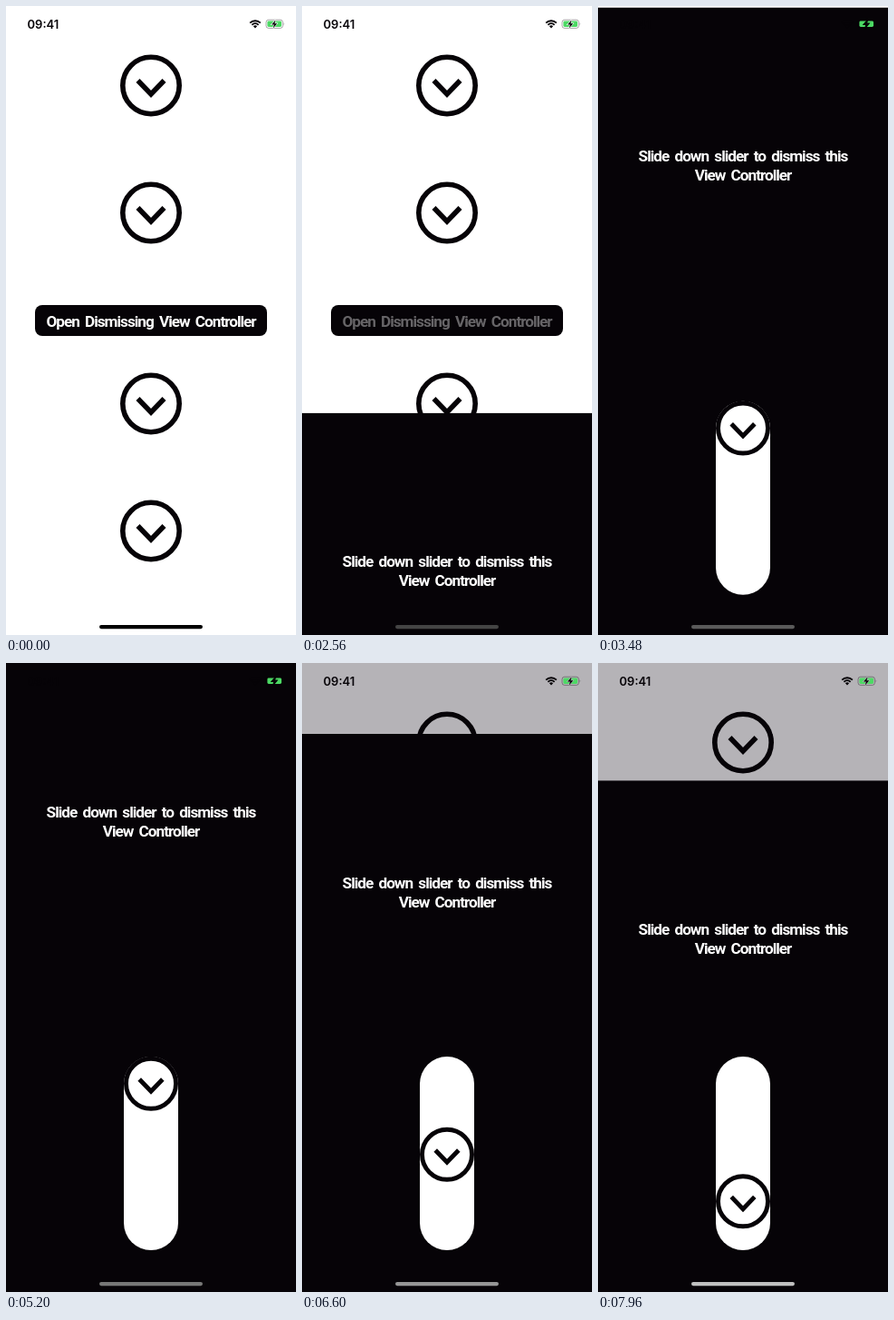
Write an HTML page that moves like this. It is 320 px wide and 692 px high and loops after 8 s.

```html
<!DOCTYPE html>
<html lang="en">
<head>
<meta charset="utf-8">
<title>Slide to dismiss</title>
<style>
  html, body { margin: 0; width: 100%; height: 100%; overflow: hidden; background: #fff; }
  svg { display: block; width: 100%; height: 100%; color: #060307; fill: currentColor; }
  .label { font: 700 17.2px Roboto, "Liberation Sans", sans-serif; letter-spacing: -1px; word-spacing: 2.9px; text-anchor: middle; fill: #fff; }
  .time { font: 600 13px Inter, sans-serif; }
</style>
</head>
<body>
<svg viewBox="0 0 320 692">
  <defs>
    <g id="arrow" fill="none" stroke="currentColor" stroke-width="5.6">
      <circle r="31.2"/>
      <path d="M-14.5-5.5 0 9.5 14.5-5.5"/>
    </g>
  </defs>

  <rect id="page" width="320" height="692" fill="#fff"/>
  <use href="#arrow" x="160" y="87.5"/>
  <use href="#arrow" x="160" y="227.5"/>
  <use href="#arrow" x="160" y="437.5"/>
  <use href="#arrow" x="160" y="577.5"/>
  <rect x="32" y="329" width="256" height="34" rx="8"/>
  <text id="title" class="label" x="160" y="353">Open Dismissing View Controller</text>

  <g id="sheet">
    <rect width="320" height="700"/>
    <text class="label" x="160" y="169.5">Slide down slider to dismiss this</text>
    <text class="label" x="160" y="190.5">View Controller</text>
  </g>
  <rect id="track" x="130" y="433" width="60" height="213" rx="30" fill="#fff"/>
  <g id="knob">
    <circle r="28" fill="#fff"/>
    <use href="#arrow" transform="scale(.882)"/>
  </g>

  <text class="time" x="23.5" y="24.5">09:41</text>
  <g transform="translate(275 24.4)">
    <path d="M-5.8-5.8A8.2 8.2 0 0 1 5.8-5.8M-3.6-3.6A5.1 5.1 0 0 1 3.6-3.6" fill="none" stroke="currentColor" stroke-width="1.9"/>
    <path d="M0 0-2.1-2.1A3 3 0 0 1 2.1-2.1Z"/>
  </g>
  <rect x="287" y="15.2" width="18.4" height="9.2" rx="2.7" fill="none" stroke="currentColor" stroke-opacity=".35"/>
  <path d="M306.6 18.2q1.4 1.6 0 3.2z" opacity=".4"/>
  <rect x="288.4" y="16.6" width="15.6" height="6.4" rx="1.4" fill="#4cd964"/>
  <path id="bolt" d="M297.6 15.2 293 20.4H295.8L294.8 24.4 299.2 19.2H296.4Z" stroke-width="1.2" paint-order="stroke"/>

  <rect id="bar" x="103" y="681" width="114" height="4.2" rx="2.1"/>
  <rect id="shade" x="130" y="681" width="60" height="4.2"/>
</svg>
<script>
const $ = id => document.getElementById(id);
const LOOP = 8000, STEP = 40, HEIGHT = 692, PRESS = 2200, OPEN = 2395.4, DRAG = 6170;

// Drag path: time, offset, speed in px/ms
const drag = [[DRAG, 0, .1], [6600, 78, .09], [7200, 109, .032], [8000, 130.5, .027]];
// Home indicator: time, grey level
const greys = [[OPEN, 0], [2560, 68], [2920, 80], [5200, 119], [6600, 150], [7200, 166], [8000, 193]];

function span(points, t) {
  let i = 1;
  while (i < points.length - 1 && t > points[i][0]) i++;
  const [a, b] = [points[i - 1], points[i]], d = b[0] - a[0];
  return { a, b, d, u: Math.min(1, Math.max(0, (t - a[0]) / d)) };
}

function linear(points, t) {
  const { a, b, u } = span(points, t);
  return a[1] + (b[1] - a[1]) * u;
}

function hermite(points, t) {
  const { a, b, d, u } = span(points, t), v = 1 - u;
  return a[1] * v * v * (1 + 2 * u) + b[1] * u * u * (3 - 2 * u)
    + d * u * v * (a[2] * v - b[2] * u);
}

// Critically damped spring
function spring(t) {
  const u = Math.max(0, t - OPEN) * .00755;
  return HEIGHT * (1 + u) * Math.exp(-u);
}

function titleAlpha(t) {
  if (t < PRESS) return 1;
  const u = Math.min(1, Math.max(0, (t - OPEN) / 520));
  return .2 + .8 * u * u * (3 - 2 * u);
}

function draw(t) {
  const dragging = t >= DRAG;
  const entry = dragging || t > 3760 ? 0 : spring(t);
  const top = dragging ? hermite(drag, t) : entry;
  const page = dragging ? '#b5b3b7' : '#fff';
  const grey = linear(greys, t);

  $('page').setAttribute('fill', page);
  $('title').setAttribute('fill-opacity', titleAlpha(t));
  $('sheet').setAttribute('transform', `translate(0 ${top})`);
  $('track').setAttribute('transform', `translate(0 ${entry})`);
  $('knob').setAttribute('transform', `translate(160 ${462.8 + top})`);
  $('bolt').setAttribute('stroke', top < 20 ? 'currentColor' : page);
  $('bar').setAttribute('fill', `rgb(${grey},${grey},${grey})`);
  $('shade').setAttribute('visibility', entry > 37 && entry < 250 ? 'visible' : 'hidden');
}

// The motion runs at 25 pictures a second; a small lead absorbs timer jitter.
const start = performance.now();
function tick() {
  const t = performance.now() - start + 10;
  draw(Math.floor(t / STEP) * STEP % LOOP);
  requestAnimationFrame(tick);
}
tick();
</script>
</body>
</html>
```
